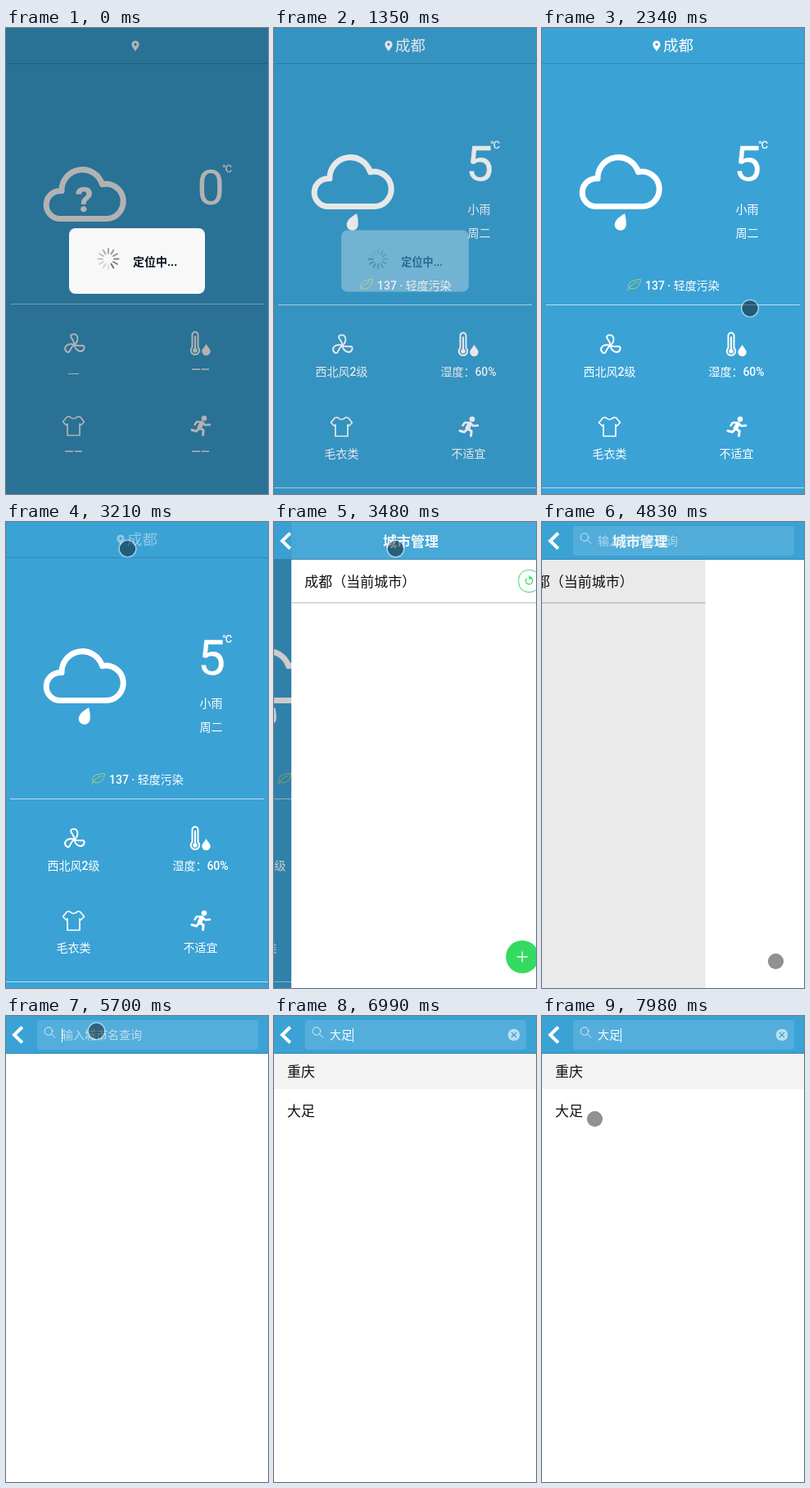
Write an HTML page that moves like this. It is 320 px wide and 568 px high and loops after 8000 ms.

```html
<!DOCTYPE html>
<html lang="zh">
<head>
<meta charset="utf-8">
<title>天气</title>
<style>
html, body { margin: 0; width: 100%; height: 100%; overflow: hidden; background: #3ba2d5; }
svg { display: block; width: 100vw; height: 100vh; }
text { font-family: Roboto, "Noto Sans CJK SC", "Noto Sans CJK", sans-serif; font-size: 14px; white-space: pre; }
#home text { font-weight: 500; }
#home .temp { font-size: 60px; font-weight: 400; }
#home .unit { font-size: 13px; }
.big { font-size: 17px; fill: #111; }
.mid { text-anchor: middle; }
.line { fill: none; stroke: #fff; stroke-linecap: round; stroke-linejoin: round; }
</style>
</head>
<body>
<svg viewBox="0 0 320 568" preserveAspectRatio="none">
  <defs>
    <path id="cloud" class="line" stroke-width="7"
      d="M64.5 217.5A17 17 0 0 1 68 183.6A25.3 25.3 0 0 1 117.5 175.6A21.2 21.2 0 1 1 121.5 217.5Z"/>
    <path id="pin" fill-rule="evenodd"
      d="M0 6.5C-2 3-4.6 1-4.6-2A4.6 4.6 0 0 1 4.6-2C4.6 1 2 3 0 6.5ZM-1.7-2A1.7 1.7 0 0 0 1.7-2A1.7 1.7 0 0 0-1.7-2Z"/>
    <path id="blade" class="line" stroke-width="2" d="M0 0C0-4-2-6-4-9C-6-13 1-14 3-11C5-8 4-3 0 0Z"/>
    <g id="fan">
      <use href="#blade"/><use href="#blade" transform="rotate(120)"/><use href="#blade" transform="rotate(240)"/>
    </g>
    <g id="thermo">
      <path class="line" stroke-width="2" d="M-3.5 4V-11A3.5 3.5 0 0 1 3.5-11V4A5.2 5.2 0 1 1-3.5 4Z"/>
      <path class="line" stroke-width="2" d="M0-9V6"/>
      <circle cy="8" r="2.8"/>
      <path d="M13.5 0C15.5 4 18.7 6 18.7 9A5.2 5.2 0 0 1 8.3 9C8.3 6 11.5 4 13.5 0Z"/>
    </g>
    <path id="shirt" class="line" stroke-width="1.7"
      d="M-5-11.5Q0-6 5-11.5L8-11L13-5L9-1L7.5-2.5V11.5H-7.5V-2.5L-9-1L-13-5L-8-11Z"/>
    <g id="runner">
      <circle cx="4" cy="-9.2" r="3.3"/>
      <path class="line" stroke-width="2.6" d="M-7.5-1.5L-5-5L1-5L5.5-1L11-1.5"/>
      <path class="line" stroke-width="5.5" d="M1-3.2L-1.5 1.8"/>
      <path class="line" stroke-width="3" d="M-1 2.5L3.2 5.5L2.5 11M-3 4L-5.5 6.5L-11 5"/>
    </g>
    <clipPath id="stage"><rect width="320" height="568"/></clipPath>
  </defs>

  <g clip-path="url(#stage)">
  <g id="home">
    <rect width="320" height="568" fill="#3ba2d5"/>
    <path d="M0 43.5H320" stroke="#2d88b7"/>
    <g id="empty" fill="#fff">
      <use href="#pin" x="158" y="22"/>
      <use href="#cloud" y="15"/>
      <text class="mid" x="95.5" y="223.5" style="font-size:43px;font-weight:700" stroke="#fff" stroke-width=".6">?</text>
      <text class="mid temp" x="250" y="214.5">0</text>
      <text class="unit" x="264.5" y="176">℃</text>
      <path d="M5 336.5H315" stroke="#fff" opacity=".6"/>
      <use href="#fan" x="83.5" y="386"/><use href="#thermo" x="231" y="385"/>
      <use href="#shirt" x="82.5" y="485"/><use href="#runner" x="238" y="485"/>
      <path d="M76 421.5H89" stroke="#fff"/>
      <path d="M227 416H237M238.5 416H248M72 516H82M83.5 516H93M227 516H237M238.5 516H248" stroke="#fff" stroke-width="1.6"/>
    </g>
    <g id="data" fill="#fff">
      <g id="place">
        <use href="#pin" x="140" y="22"/>
        <text x="148" y="28" style="font-size:18.5px;font-weight:400">成都</text>
      </g>
      <use href="#cloud"/>
      <path d="M101 226C102.500 231 103 236 102.700 239A7 7 0 1 1 89.800 236C91.500 232 96.500 229 101 226Z"/>
      <text class="mid temp" x="251" y="185.500" stroke="#fff" stroke-width=".4">5</text>
      <text class="unit" x="264.500" y="147">℃</text>
      <text class="mid" x="250.500" y="226">小雨</text>
      <text class="mid" x="250.500" y="255">周二</text>
      <path class="line" style="stroke:#a5cf78" d="M104.500 320C109 313 112 311 117 309.500M106 317C104 309 111 307 120.500 306.500C120 315 114 320 107 317"/>
      <text x="126" y="319">137 · 轻度污染</text>
      <path d="M5 337.500H315" stroke="#fff" opacity=".65"/>
      <use href="#fan" x="83.500" y="387"/><use href="#thermo" x="231" y="386"/>
      <use href="#shirt" x="82.500" y="486"/><use href="#runner" x="238" y="486"/>
      <text class="mid" x="82.500" y="424">西北风2级</text>
      <text class="mid" x="237.500" y="424" style="font-family:Roboto,'Noto Sans CJK TC',sans-serif">湿度：60%</text>
      <text class="mid" x="82.500" y="524">毛衣类</text>
      <text class="mid" x="237.500" y="524">不适宜</text>
      <path d="M0 560.500H320" stroke="#fff" opacity=".65"/>
    </g>
    <rect id="homeDim" width="320" height="568"/>
  </g>

  <g id="city">
    <rect width="320" height="568" fill="#fff"/>
    <text class="big" x="16" y="79">成都（当前城市）</text>
    <path d="M0 98.500H320" stroke="#b4bdc3"/>
    <rect x="277.500" y="58.500" width="26" height="27" rx="12" fill="none" stroke="#33db60"/>
    <path d="M292 67.800A4.200 4.200 0 1 1 287.500 68.700" fill="none" stroke="#33db60" stroke-width="1.300"/>
    <path d="M290 65L294.500 68L290.500 70.500Z" fill="#33db60"/>
    <circle id="add" cx="282" cy="530" r="20" fill="#33db60"/>
    <path d="M275.500 530H288.500M282 523.500V536.500" stroke="#fff" stroke-width="1.300"/>
    <rect id="cityDim" width="320" height="568"/>
  </g>

  <g id="search">
    <rect width="320" height="568" fill="#fff"/>
    <g id="results">
      <rect y="46" width="320" height="43" fill="#f3f3f3"/>
      <text class="big" x="16" y="74">重庆</text>
      <text class="big" x="16" y="122">大足</text>
    </g>
  </g>

  <g id="bar">
    <rect width="320" height="46" fill="#3ba2d5"/>
    <path d="M0 45.500H320" stroke="#2f86b2"/>
    <path d="M19.800 13.500L10 23L19.800 32.500" fill="none" stroke="#fff" stroke-width="4"/>
    <g id="field">
      <rect x="38" y="5" width="270" height="36" rx="4" fill="#fff" fill-opacity=".13"/>
      <g class="line" stroke-opacity=".75"><circle cx="52" cy="18.500" r="4.800"/><path d="M55.500 22L60 26.500"/></g>
      <text id="hint" x="68" y="28" fill="#fff" fill-opacity=".6">输入城市名查询</text>
      <text id="typed" x="68" y="28" fill="#fff"></text>
      <path id="caret" d="M68.500 15V32" stroke="#fff"/>
      <g id="clear">
        <circle cx="293" cy="23" r="7.300" fill="#fff" fill-opacity=".6"/>
        <path d="M290 20L296 26M296 20L290 26" stroke="#3ba2d5" stroke-width="1.300"/>
      </g>
    </g>
    <text id="title" class="mid" x="160" y="30" fill="#fff" style="font-size:17px;font-weight:700">城市管理</text>
  </g>

  <g id="loading">
    <rect id="shade" width="320" height="568"/>
    <g id="popup">
      <rect x="77" y="244" width="166" height="80" rx="8" fill="#f8f8f8"/>
      <g id="spinner" transform="translate(125 281.500)"></g>
      <text x="155" y="290" fill="#0a1420" style="font-weight:700">定位中...</text>
    </g>
  </g>

  <g id="touch">
    <circle r="9.700" fill-opacity=".43"/>
    <circle r="10.400" fill="none" stroke="#fff" stroke-opacity=".5" stroke-width="1.400"/>
  </g>
  </g>
</svg>
<script>
const LOOP = 8000;
const el = {};
document.querySelectorAll('[id]').forEach(n => el[n.id] = n);

el.spinner.innerHTML = Array.from({ length: 12 }, (_, i) =>
  `<path d="M0-7V-12.5" stroke="#69757f" stroke-width="2" stroke-linecap="round" transform="rotate(${i * 30})"/>`).join('');
const spokes = [...el.spinner.children];

const clamp = v => Math.max(0, Math.min(1, v));
const span = (t, a, b) => clamp((t - a) / (b - a));
const inOut = u => u < .5 ? 2 * u * u : 1 - 2 * (1 - u) ** 2;
const show = (n, on) => n.style.display = on ? '' : 'none';
const fade = (n, o) => n.setAttribute('opacity', o);
const move = (n, x, y = 0) => n.setAttribute('transform', `translate(${x} ${y})`);
const cubic = (a, b, c, d, u) => {
  const v = 1 - u;
  return v * v * v * a + 3 * v * v * u * b + 3 * v * u * u * c + u * u * u * d;
};

// cubic-bezier(.36, .66, .04, 1)
function slide(x) {
  if (x <= 0 || x >= 1) return x;
  let lo = 0, hi = 1;
  for (let i = 0; i < 20; i++) {
    const m = (lo + hi) / 2;
    if (cubic(0, .36, .04, 1, m) < x) lo = m; else hi = m;
  }
  return cubic(0, .66, 1, 1, lo);
}

const easeIn = u => u * u * (1.5 - .5 * u);
const easeOut = u => 1 - (1 - u) ** 1.5;

// start, end, easing, then the four control points
const moves = [
  [2280, 3060, inOut, 255, 349, 230, 150, 65, 30, 148.5, 32.5],
  [3480, 4680, inOut, 148.5, 32.5, 265, 30, 295, 120, 285.5, 535.5],
  [4890, 5520, inOut, 285.5, 535.5, 190, 400, 250, 20, 110.5, 18.5],
  [7230, 7590, easeIn, 110.5, 18.5, 118, 5, 155, 60, 151, 95],
  [7590, 7960, easeOut, 151, 95, 148, 130, 50, 165, 64.5, 125.5]
];

const keys = [[6330, 'd'], [6410, 'da'], [6490, "da'z"], [6570, "da'zu"], [6650, '大足']];

function drawTouch(t) {
  show(el.touch, t >= 2280 && (t < 6330 || t >= 7230));
  const m = moves.filter(p => t >= p[0]).pop();
  if (!m) return;
  const [a, b, ease, x0, y0, x1, y1, x2, y2, x3, y3] = m;
  const u = ease(span(t, a, b));
  move(el.touch, cubic(x0, x1, x2, x3, u), cubic(y0, y1, y2, y3, u));
}

function drawLoading(t) {
  show(el.loading, t < 1410);
  const out = span(t, 1200, 1420);
  const s = 1 - .09 * out;
  fade(el.shade, .3 * (1 - out));
  fade(el.popup, 1 - out);
  el.popup.setAttribute('transform', `translate(160 284) scale(${s}) translate(-160 -284)`);
  const head = 5 + Math.floor(t / 80);
  spokes.forEach((n, i) => fade(n, 1 - .075 * ((head - i + 24) % 12)));
}

function drawPages(t) {
  const p = slide(span(t, 3240, 3740));
  const q = slide(span(t, 4753, 5253));
  show(el.empty, t < 1200);
  show(el.data, t >= 1200);
  fade(el.place, t >= 3120 ? .42 * (1 - p) : 1);
  show(el.home, p < 1);
  move(el.home, -p * 107);
  fade(el.homeDim, .22 * p);
  show(el.city, p > 0 && q < 1);
  move(el.city, 320 * (1 - p) - 107 * q);
  fade(el.cityDim, .22 * q);
  el.add.setAttribute('fill', t >= 4680 ? '#2bc553' : '#33db60');
  show(el.search, q > 0);
  move(el.search, 320 * (1 - q));
  fade(el.bar, p);
  move(el.title, 107 * (1 - p) - 107 * q);
  fade(el.title, p * (1 - q * q));
  fade(el.field, clamp(q * 2.4));
}

function drawField(t) {
  const key = keys.filter(k => t >= k[0]).pop();
  const word = key ? key[1] : '';
  if (el.typed.textContent !== word) el.typed.textContent = word;
  el.typed.setAttribute('text-decoration', t < 6650 ? 'underline' : 'none');
  show(el.hint, !key);
  show(el.clear, !!key);
  show(el.caret, key || (t >= 5700 && t < 6150));
  move(el.caret, key ? Math.round(el.typed.getComputedTextLength()) : 0);
  show(el.results, t >= 6990);
}

function draw(t) {
  drawLoading(t);
  drawPages(t);
  drawField(t);
  drawTouch(t);
}

const start = performance.now();
function tick() {
  draw((performance.now() - start) % LOOP);
  requestAnimationFrame(tick);
}
tick();
</script>
</body>
</html>
```
